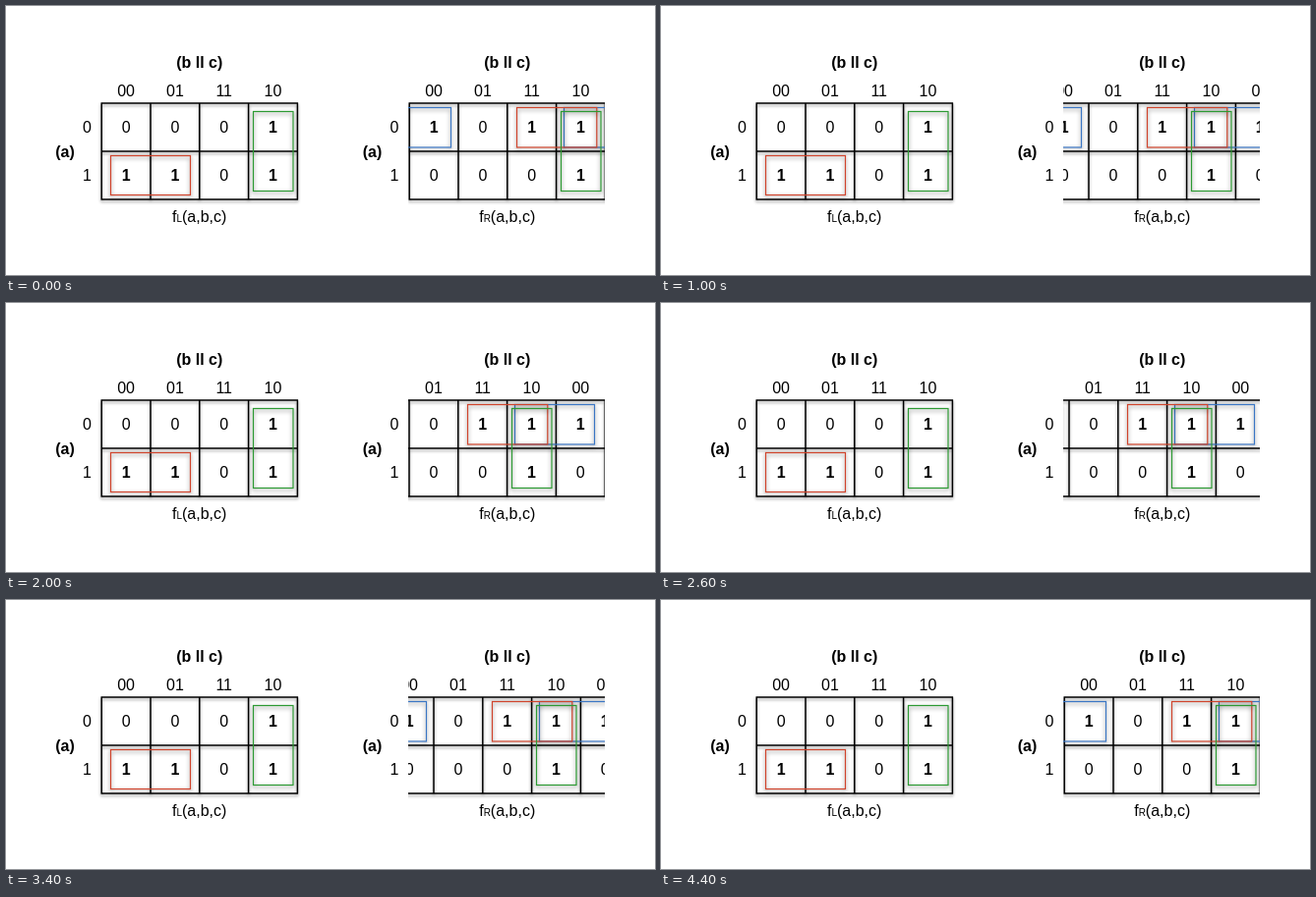
These frames come from a looping animation (660x274 px, 4.6 s). An HTML page:

```html
<!DOCTYPE html>
<html lang="en">
<head>
<meta charset="utf-8">
<title>Sliding Karnaugh map</title>
<style>
  html, body { margin: 0; width: 100%; height: 100%; overflow: hidden; background: #fff; }
  svg { display: block; }
  text { font: 16px "Liberation Sans", Arial, sans-serif; text-anchor: middle; }
  .b { font-weight: bold; }
  .sub { font-size: 10px; }
  .grid { fill: none; stroke: #000; stroke-width: 1.5; filter: drop-shadow(0 2px 1.5px rgba(0,0,0,.4)); }
  .loop { fill: none; stroke-width: 1.2; filter: drop-shadow(0 2px 2px rgba(0,0,0,.5)); }
</style>
</head>
<body>
<svg id="stage" width="660" height="274" viewBox="0 0 660 274">
  <defs><clipPath id="window"><rect x="409" y="70" width="200" height="136"/></clipPath></defs>
  <g id="left"></g>
  <g id="right"></g>
  <g clip-path="url(#window)"><g id="strip"></g></g>
</svg>
<script>
const NS = "http://www.w3.org/2000/svg";
const $ = id => document.getElementById(id);
const RED = "#d0432b", GREEN = "#2c9a32", BLUE = "#3a76c4";
const PITCH = 49.8, ROWS = [99, 148, 197];
const STEP = 200, LOOP = 4600, SHIFT = 50;

function add(parent, tag, attrs) {
  const el = document.createElementNS(NS, tag);
  for (const k in attrs) el.setAttribute(k, attrs[k]);
  parent.appendChild(el);
  return el;
}

function label(parent, x, y, str, bold) {
  const el = add(parent, "text", { x, y, class: bold ? "b" : "" });
  el.textContent = str;
  return el;
}

function loop(parent, color, x1, y1, x2, y2) {
  add(parent, "rect", { class: "loop", stroke: color, x: x1, y: y1, width: x2 - x1, height: y2 - y1 });
}

// Column headings, grid lines and cell values
function table(parent, x0, heads, rows) {
  const end = x0 + PITCH * heads.length;
  let d = ROWS.map(y => `M${x0 - .7} ${y}H${end + .7}`).join("");
  for (let i = 0; i <= heads.length; i++) d += `M${x0 + i * PITCH} ${ROWS[0]}V${ROWS[2]}`;
  add(parent, "path", { class: "grid", d });
  heads.forEach((h, i) => {
    const x = x0 + PITCH * (i + .5);
    label(parent, x, 91.5, h);
    rows.forEach((r, j) => label(parent, x, 129 + 49 * j, r[i], r[i] === "1"));
  });
}

// Fixed captions around a table
function captions(parent, cx, ax, rx, sub) {
  label(parent, cx, 63, "(b ll c)", true);
  label(parent, ax, 154, "(a)", true);
  label(parent, rx, 129, "0");
  label(parent, rx, 178, "1");
  const f = label(parent, cx, 220, "f");
  const s = add(f, "tspan", { class: "sub" });
  s.textContent = sub;
  f.append("(a,b,c)");
}

const left = $("left"), right = $("right"), strip = $("strip");

captions(left, 196.7, 60, 82.5, "L");
table(left, 97.2, ["00", "01", "11", "10"], ["0001", "1101"]);
loop(left, RED, 106.5, 152.5, 187.5, 192.5);
loop(left, GREEN, 251.5, 107.5, 292, 188.5);

captions(right, 509.7, 372.5, 395, "R");
table(strip, 410.2, ["00", "01", "11", "10", "00"], ["10111", "00010"]);
loop(strip, BLUE, 370, 103.5, 452.5, 144);
loop(strip, BLUE, 567.5, 103.5, 648.5, 144);
loop(strip, RED, 519.5, 103.5, 600.8, 144);
loop(strip, GREEN, 564.5, 107.5, 605, 188.5);

// Five pixels per step, out and back, with a rest at the far end
function draw(ms) {
  const n = Math.floor((ms % LOOP) / STEP);
  const dx = Math.min(SHIFT, 5 * n, 5 * (LOOP / STEP - 1 - n));
  strip.setAttribute("transform", `translate(${-dx} 0)`);
}

const start = performance.now();
function tick(now) {
  draw(Math.max(0, now - start));
  requestAnimationFrame(tick);
}
draw(0);
requestAnimationFrame(tick);
</script>
</body>
</html>
```
